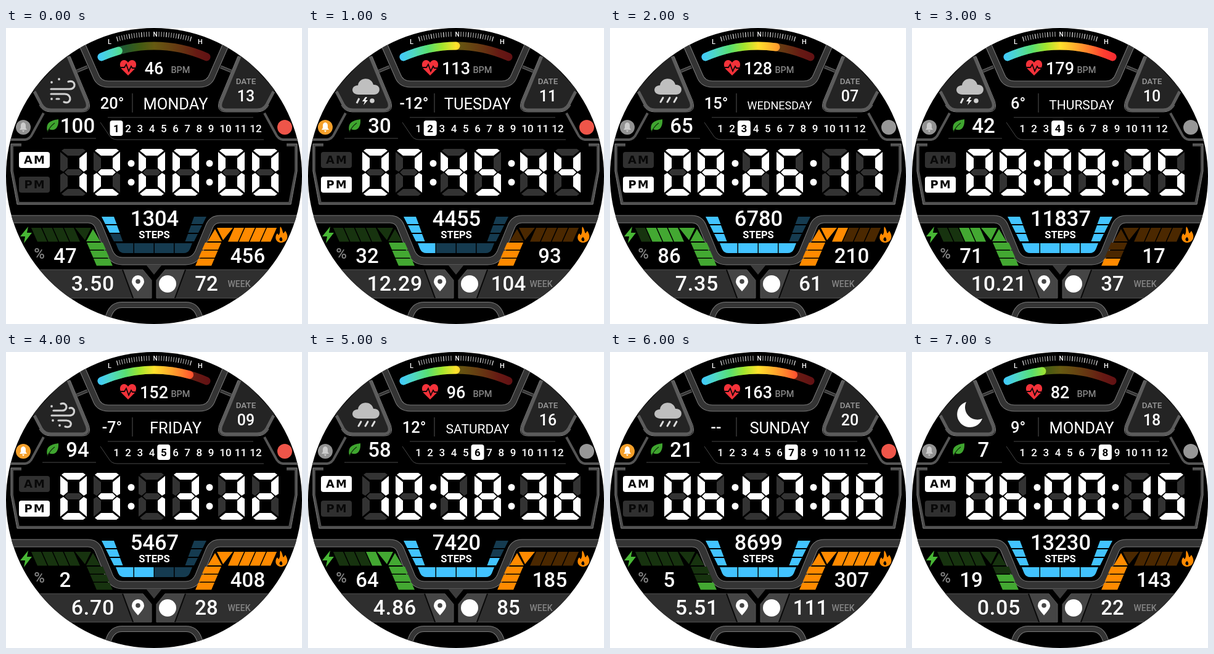
Animation of 480x480 px, one loop 8 s. Source, as an HTML page with a canvas:

```html
<!DOCTYPE html>
<html lang="en">
<head>
<meta charset="utf-8">
<title>Watch face</title>
<style>
html, body { margin: 0; width: 100%; height: 100%; overflow: hidden; background: #fff; }
canvas { display: block; width: 480px; height: 480px; }
</style>
</head>
<body>
<canvas id="face" width="480" height="480"></canvas>
<script>
const ctx = document.getElementById('face').getContext('2d');
const STEP = 1000;
const SANS = 'Roboto, sans-serif';
const WIDE = '"DejaVu Sans", sans-serif';
const GREEN = ['#17330f', '#43a832'];
const ORANGE = ['#4b2800', '#ff8a00'];
const BLUE = ['#153b50', '#42c3ff'];

// Bars are lit segment counts: pulse of 6, steps of 10, battery and energy of 9.
const states = [
  { time: '120000', am: true,  day: 'MONDAY',    date: '13', temp: '20°',  sky: 'breeze', air: 100, pulse: 46,  steps: 1304,  battery: 47, energy: 456, distance: '3.50',  week: 72,  bars: [1, 2, 4, 9],   bell: false, link: true },
  { time: '074544', am: false, day: 'TUESDAY',   date: '11', temp: '-12°', sky: 'storm',  air: 30,  pulse: 113, steps: 4455,  battery: 32, energy: 93,  distance: '12.29', week: 104, bars: [3, 4, 3, 3],   bell: true,  link: true },
  { time: '082617', am: false, day: 'WEDNESDAY', date: '07', temp: '15°',  sky: 'rain',   air: 65,  pulse: 128, steps: 6780,  battery: 86, energy: 210, distance: '7.35',  week: 61,  bars: [4, 7, 8, 6],   bell: false, link: false },
  { time: '090925', am: false, day: 'THURSDAY',  date: '10', temp: '6°',   sky: 'storm',  air: 42,  pulse: 179, steps: 11837, battery: 71, energy: 17,  distance: '10.21', week: 37,  bars: [6, 10, 7, 1],  bell: false, link: false },
  { time: '031332', am: false, day: 'FRIDAY',    date: '09', temp: '-7°',  sky: 'gale',   air: 94,  pulse: 152, steps: 5467,  battery: 2,  energy: 408, distance: '6.70',  week: 28,  bars: [5, 5, 0, 9],   bell: true,  link: true },
  { time: '105836', am: true,  day: 'SATURDAY',  date: '16', temp: '12°',  sky: 'rain',   air: 58,  pulse: 96,  steps: 7420,  battery: 64, energy: 185, distance: '4.86',  week: 85,  bars: [3, 8, 6, 5],   bell: false, link: false },
  { time: '064708', am: true,  day: 'SUNDAY',    date: '20', temp: '--',   sky: 'rain',   air: 21,  pulse: 163, steps: 8699,  battery: 5,  energy: 307, distance: '5.51',  week: 111, bars: [5, 10, 1, 9],  bell: true,  link: true },
  { time: '060015', am: true,  day: 'MONDAY',    date: '18', temp: '9°',   sky: 'moon',   air: 7,   pulse: 82,  steps: 13230, battery: 19, energy: 143, distance: '0.05',  week: 22,  bars: [2, 10, 2, 4],  bell: false, link: false }
];

function fill(path, color) {
  ctx.fillStyle = color;
  ctx.fill(new Path2D(path));
}

function line(path, color, width = 1) {
  ctx.strokeStyle = color;
  ctx.lineWidth = width;
  ctx.stroke(new Path2D(path));
}

function bezel(path, width = 9) {
  line(path, '#7a7a7a', width + 2);
  line(path, '#343434', width);
}

function disc(x, y, r, color) {
  ctx.fillStyle = color;
  ctx.beginPath();
  ctx.arc(x, y, r, 0, Math.PI * 2);
  ctx.fill();
}

function box(x, y, w, h, r, color) {
  ctx.fillStyle = color;
  ctx.beginPath();
  ctx.roundRect(x, y, w, h, r);
  ctx.fill();
}

function text(value, x, y, size, color = '#fff', weight = 500, family = SANS, spacing = 0) {
  ctx.font = `${weight} ${size}px ${family}`;
  ctx.letterSpacing = `${spacing}px`;
  ctx.fillStyle = color;
  ctx.fillText(value, x + spacing / 2, y);
}

function moved(x, y, sx, sy, draw) {
  ctx.save();
  ctx.translate(x, y);
  ctx.scale(sx, sy);
  draw();
  ctx.restore();
}

function bothSides(draw) {
  draw();
  moved(480, 0, -1, 1, draw);
}

function drawFrame() {
  bothSides(() => {
    fill('M98 42L132 121Q136 134 122 134H72Q60 134 54 122L44 100Z', '#242424');
    line('M101 46L131 119Q136 133 122 133H73Q62 133 57 124L46 103', '#5c5c5c', 5);
    line('M104 46L134 118Q140 136 123 136H72Q60 136 54 125', '#808080');
    bezel('M115 70L132 63', 3);
    line('M4 181H31Q39 180 43 171L61 138', '#555', 4);
    line('M25 190H10V232L20 284H240', '#4c4c4c', 4);
    line('M25 188H8V232L18 286H240', '#808080');
    fill('M0 392H222L236 409V438H0Z', '#2f2f2f');
    fill('M190 392H222L236 409V438H207Z', '#454545');
    line('M0 392H222L236 409V438H0', '#555');
    line('M189 392L206 438', '#080808', 2);
  });
  bezel('M116 10L145 76Q150 91 166 91H314Q330 91 335 76L364 10');
  bezel('M0 310H133Q145 310 150 321L166 360Q172 378 189 378H291Q308 378 314 360L330 321Q335 310 347 310H480', 11);
  fill('M227 384H253L240 400Z', '#3c3c3c');
  bezel('M158 488L167 465Q173 449 188 449H292Q307 449 313 465L322 488', 8);
  line('M59 179H146M153 153L168 175Q172 181 180 181H418M165 145H401', '#484848');
  line('M205 106V137', '#555');
}

function drawCompass() {
  for (let i = -15; i <= 15; i++) {
    if (Math.abs(i) < 2) continue;
    ctx.save();
    ctx.translate(240, 240);
    ctx.rotate(i * Math.PI / 180);
    line('M0 -234V-226', i % 5 ? '#999' : '#ddd', 1.3);
    ctx.restore();
  }
  text('L', 168, 26, 11);
  text('N', 242, 14, 10);
  text('H', 315, 26, 11);
}

function drawPulseArc(level) {
  const colors = ctx.createLinearGradient(149, 0, 332, 0);
  ['#40c9ff', '#4fd8c0', '#58e070', '#a4e52d', '#ffe12c', '#ffb02c', '#ff7d2d', '#ff4030', '#f42932']
    .forEach((color, i) => colors.addColorStop(i / 8, color));
  const arc = (count, alpha) => {
    const start = -Math.PI / 2 - 0.415;
    ctx.globalAlpha = alpha;
    ctx.strokeStyle = colors;
    ctx.lineWidth = 13;
    ctx.lineCap = 'round';
    ctx.beginPath();
    ctx.arc(240, 240, 211, start, start + 0.83 * count / 6);
    ctx.stroke();
  };
  ctx.save();
  arc(6, 0.4);
  arc(level, 1);
  ctx.restore();
}

function drawSideBar(level, [dim, lit]) {
  const color = i => i < level ? lit : dim;
  for (let i = 0; i < 3; i++) {
    const y = 374 - 13 * i;
    const left = 131 + (y - 348) * 0.42;
    fill(`M${left} ${y}h26l5 11.5h-26Z`, color(i));
  }
  fill('M141 326L153 346H130Z', color(3));
  fill('M112 324H138L128 344Z', color(4));
  for (let i = 0; i < 4; i++) {
    fill(`M${94 - 17.7 * i} 324h16l10 22.5h-16Z`, color(5 + i));
  }
}

function drawStepBar(level) {
  const color = i => BLUE[i < level ? 1 : 0];
  const column = i => {
    const outer = 155 + 7 * i;
    const inner = 175 + 5 * i;
    const y = 306 + 14 * i;
    return `M${outer} ${y}H${inner}L${inner + 4.5} ${y + 12}H${outer + 6}Z`;
  };
  const corner = 'M178 349H206.5V365H192Q185 365 182 359Z';
  for (let i = 0; i < 3; i++) {
    fill(column(i), color(i));
    moved(480, 0, -1, 1, () => fill(column(i), color(9 - i)));
  }
  fill(corner, color(3));
  fill('M208 349h31.5v16h-31.5Z', color(4));
  fill('M241 349h31v16h-31Z', color(5));
  moved(480, 0, -1, 1, () => fill(corner, color(6)));
}

const edgeBar = 'M6 0H37L41 3L31 11H12L2 3Z';
const sideBar = 'M0 5L12 15V31L5 37L0 34Z';
const barPaths = {
  a: [edgeBar, 1, 1],
  d: [edgeBar, 1, -1],
  f: [sideBar, 1, 1],
  b: [sideBar, -1, 1],
  e: [sideBar, 1, -1],
  c: [sideBar, -1, -1],
  g: ['M12 33H31L36 38L31 43H12L7 38Z', 1, 1]
};
const litBars = ['abcdef', 'bc', 'abdeg', 'abcdg', 'bcfg', 'acdfg', 'acdefg', 'abc', 'abcdefg', 'abcdfg'];

function drawClock(time) {
  [88, 142, 215, 270, 344, 399].forEach((x, i) => {
    for (const [name, [path, sx, sy]] of Object.entries(barPaths)) {
      const color = litBars[time[i]].includes(name) ? '#fff' : '#333';
      moved(x + (sx < 0 ? 43 : 0), 196 + (sy < 0 ? 76 : 0), sx, sy, () => fill(path, color));
    }
  });
  for (const x of [203, 330]) {
    for (const y of [219.5, 250]) disc(x, y, 5.5, '#fff');
  }
}

function drawHalf(label, y, on) {
  box(21, y, 50, 26, 4, on ? '#fff' : '#303030');
  text(label, 46, y + 19, 18, '#080808', 700, WIDE, 2);
}

function drawMonths(month) {
  for (let i = 1; i <= 12; i++) {
    const x = i < 10 ? 179 + 19.2 * (i - 1) : 356 + 24.5 * (i - 10);
    const on = i === month;
    if (on) box(x - 10.5, 150, 21, 25, 4, '#fff');
    text(i, x, 169, 17, on ? '#000' : '#fff', on ? 700 : 500);
  }
}

function cloud() {
  fill('M82 108C69 108 69 93 81 93C83 79 103 79 106 92C119 91 119 108 107 108Z', '#bfbfbf');
}

function wind(path, dots) {
  ctx.lineCap = 'round';
  line(path, '#d0d0d0', 3.2);
  ctx.lineCap = 'butt';
  for (const [x, y] of dots) disc(x, y, 1.9, '#d0d0d0');
}

const skies = {
  breeze() {
    wind('M73 99H103C115 99 113 83 101 87M73 107H95C108 107 106 125 94 120M82 115H86',
      [[74, 88], [86, 83], [74, 115]]);
  },
  gale() {
    wind('M77 95H91C102 95 99 80 89 84M74 103H103C114 103 112 88 103 91M85 111H98C109 111 107 125 96 121',
      [[74, 88], [76, 111], [87, 119]]);
  },
  storm() {
    cloud();
    line('M83 114L79 122', '#ddd', 3);
    fill('M93 112L88 119H92L90 125L97 117H93L96 112Z', '#fff');
    disc(104, 118, 3.8, '#d0d0d0');
  },
  rain() {
    cloud();
    ctx.lineCap = 'round';
    line('M86 113L82 120M97 113L93 120M108 113L104 120', '#ddd', 3);
    ctx.lineCap = 'butt';
  },
  moon() {
    fill('M88 81A21 21 0 1 0 114 108A20 20 0 0 1 88 81Z', '#fff');
  }
};

function drawIcons(s) {
  skies[s.sky]();
  fill('M198 77L187 66C180 55 192 47 198 56C204 47 216 55 209 66Z', '#f4323a');
  line('M184 64H192L195 59L199 70L203 62L205 65H212', '#100608', 1.8);
  fill('M67 167C64 153 73 150 85 148C86 163 78 168 70 164Z', '#3fa52f');
  line('M67 169Q71 160 79 154', '#102b0c', 1.2);
  fill('M36 322L23 338H31L29 349L42 332H34Z', '#48b735');
  fill('M445 322C449 327 448 331 450 333L453 329C461 341 453 348 446 348C437 348 435 338 440 333L442 336C446 331 443 327 445 322Z', '#ff8a00');
  fill('M446 346C442 344 443 341 446 339C449 342 449 345 446 346Z', '#090909');
  fill('M214 427C207 419 204 415 204 411A10 10 0 0 1 224 411C224 415 221 419 214 427Z', '#fff');
  disc(214, 411, 3.8, '#454545');
  disc(262, 415, 14, '#fff');
  disc(28, 161, 12, s.bell ? '#f5a02b' : '#929292');
  fill('M22 165L24 162V158Q24 154 28 153Q32 154 32 158V162L34 165ZM26 166H30L28 169Z', s.bell ? '#fff' : '#ccc');
  disc(452, 161, 12, s.link ? '#ee5549' : '#979797');
}

function drawText(s) {
  const daySize = s.day.length > 8 ? 18 : s.day.length > 7 ? 21 : 25.5;
  text(s.pulse, 240, 75, 27);
  text('BPM', 283, 73, 14.5, '#858585');
  text('DATE', 389, 91, 13.5, '#999');
  text(s.date, 389, 119, 25);
  text(s.temp, 172, 131, 25.5);
  text(s.day, 275, 132, daySize, '#fff', 400);
  text(s.air, 116, 170, 33);
  text(s.steps, 241, 321, 34.5);
  text('STEPS', 240.5, 341, 16.5, '#fff', 700);
  text('%', 54, 374, 24, '#858585');
  text(s.battery, 96, 381, 33);
  text(s.energy, 392, 381, 33);
  text(s.distance, 140.5, 426, 34, '#fff', 500, SANS, 0.7);
  text(s.week, 325, 426, 33);
  text('WEEK', 378, 420, 14, '#858585');
}

function draw(index) {
  const s = states[index];
  const [pulse, steps, battery, energy] = s.bars;
  ctx.clearRect(0, 0, 480, 480);
  ctx.save();
  ctx.beginPath();
  ctx.arc(240, 240, 240, 0, Math.PI * 2);
  ctx.clip();
  ctx.fillStyle = '#000';
  ctx.fillRect(0, 0, 480, 480);
  ctx.textAlign = 'center';
  drawFrame();
  drawCompass();
  drawPulseArc(pulse);
  drawMonths(index + 1);
  drawHalf('AM', 201, s.am);
  drawHalf('PM', 241, !s.am);
  drawClock(s.time);
  drawStepBar(steps);
  drawSideBar(battery, GREEN);
  moved(480, 0, -1, 1, () => drawSideBar(energy, ORANGE));
  drawIcons(s);
  drawText(s);
  ctx.restore();
}

const start = performance.now();

function tick() {
  draw(Math.floor((performance.now() - start) / STEP) % states.length);
  requestAnimationFrame(tick);
}
tick();
</script>
</body>
</html>
```
